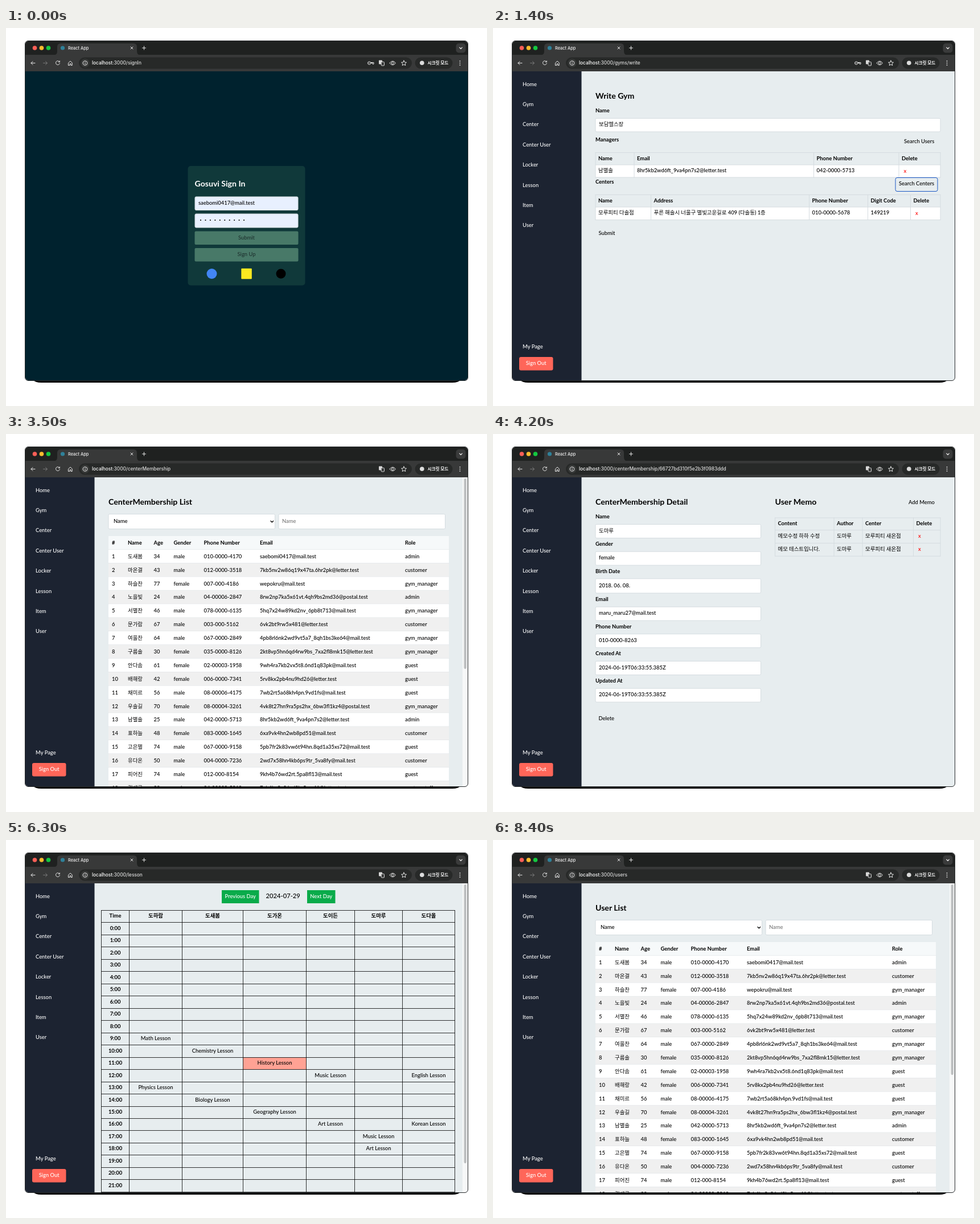
These frames come from a looping animation (845 by 663 pixels, 9.1 s). An HTML page:

```html
<!DOCTYPE html>
<html lang="ko">
<head>
<meta charset="utf-8">
<title>Gym admin tour</title>
<style>
html, body { margin: 0; width: 845px; height: 663px; overflow: hidden; background: #fff }
svg { display: block; font: 500 9.4px Lato, "Noto Sans CJK KR", "Noto Sans CJK", sans-serif }
.ui { font-family: Inter, "Noto Sans CJK KR", "Noto Sans CJK", sans-serif }
.b { font-weight: 700 }
.h { font-weight: 700; font-size: 14.1px }
.m { text-anchor: middle }
.line { fill: none; stroke-linecap: round; stroke-linejoin: round }
</style>
</head>
<body>
<svg id="stage" width="845" height="663" viewBox="0 0 845 663">
  <defs><clipPath id="win"><rect x="34" y="23" width="777" height="595" rx="5"/></clipPath></defs>
  <path d="M47 617H799Q795 622 784 622H62Q51 622 47 617Z"/>
  <g clip-path="url(#win)"><g id="page"></g><g id="chrome"></g></g>
  <rect x="33.5" y="22.5" width="778" height="596" rx="5.5" fill="none" stroke="#292c2d"/>
</svg>
<script>
const STEP = 700;
const EDGE = '#d5dce0', BG = '#e7edef';

const text = (x, y, s, cls = '', fill = '#000', extra = '') =>
  `<text x="${x}" y="${y}" class="${cls}" fill="${fill}" ${extra}>${s}</text>`;
const box = (x, y, x2, y2, fill, r = 0, stroke = 'none') =>
  `<rect x="${x}" y="${y}" width="${x2 - x}" height="${y2 - y}" rx="${r}" fill="${fill}" stroke="${stroke}"/>`;
const dot = (x, y, r, fill) => `<circle cx="${x}" cy="${y}" r="${r}" fill="${fill}"/>`;
const line = (d, stroke = '#e4e4e4', w = 1) =>
  `<path class="line" d="${d}" stroke="${stroke}" stroke-width="${w}"/>`;
const each = (list, fn) => list.map(fn).join('');
const label = (y, s) => text(180, y, s, 'b');
const title = (s, x = 180) => text(x, 124, s, 'h');
const button = (x, y, x2, y2, s, fill, r = 3, ink = '#fff') =>
  box(x, y, x2, y2, fill, r) + text((x + x2) / 2, (y + y2) / 2 + 2.3, s, 'm', ink);
const input = (x, y, x2, y2, s, ink) =>
  box(x, y, x2, y2, '#fff', 2, EDGE) + text(x + 6, (y + y2) / 2 + 2.2, s, '', ink);
const select = (x, y, x2, y2, s) =>
  box(x, y, x2, y2, '#fff', 2, EDGE) + text(x + 9, (y + y2) / 2 + 2.4, s) +
  line(`M${x2 - 7.5} ${(y + y2) / 2 - 1}l2.3 2.3 2.3-2.3`, '#000', 1.3);
const scrollbar = end => box(802, 76, 811, 618, '#f7f8f8') + box(804.5, 78, 809, end, '#bfc1c2', 2.2);

// Text block centred on cy
const block = (x, cy, s, cls) => {
  const lines = String(s).split('\n');
  return each(lines, (t, i) => text(x, cy + 3.2 + (i - (lines.length - 1) / 2) * 11.6, t, cls));
};

// Bordered table; "x" cells are red delete marks
const grid = (xs, ys, rows, fill) => {
  const [x0, x1, y0, y1] = [xs[0], xs.at(-1), ys[0], ys.at(-1)];
  return box(x0, ys[1], x1, y1, fill) +
    line(each(xs, x => `M${x} ${y0}V${y1}`) + each(ys, y => `M${x0} ${y}H${x1}`), EDGE) +
    each(rows, (row, r) => each(row, (s, c) => s === 'x'
      ? text(xs[c] + 8.5, ys[r] + 13.5, s, '', '#f00')
      : text(xs[c] + 5, ys[r] + 13.2, s, r ? '' : 'b')));
};

// Striped list; heights[0] is the header
const striped = (xs, x2, y, heights, rows) => each(rows, (row, r) => {
  const h = heights[r] ?? heights.at(-1), cy = y + h / 2;
  const out = box(180, y, x2, y + h, r ? (r % 2 ? '#fff' : '#f0f0f0') : '#f6f9fa') +
    line(`M180 ${y + h}H${x2}`, '#d9dee1', .8) +
    each(row, (s, c) => Array.isArray(s) ? facilities(xs[c], cy, s) : block(xs[c], cy, s, r ? '' : 'b'));
  y += h;
  return out;
});

const ICONS = {
  towel: 'M-3-5H5V3H-3ZM-5 2H3V5H-5ZM-3 0H5',
  locker: 'M-5-5H5V5H-5ZM0-5V5M-3-2H-2M2-2H3M-3 0H-2M2 0H3',
  wifi: 'M-5-1Q0-6 5-1M-3 1Q0-2 3 1M-1 3H1',
  shower: 'M-4 5V-3Q-4-5 0-5Q4-5 4-1H-1M-1 1V2M2 1V2M4 1V2M0 4V5M3 4V5M-5 5H-2',
  gymClothing: 'M-5 0Q-3-5 1-4Q5-3 5 4H2V0L0-2L-2 0V4M-3-1H3',
  parking: 'M-4.5-4.5H4.5V4.5H-4.5ZM-1 3V-2.5H1Q3-1 1 .5H-1',
  bodyCompositionAnalysis: 'M-4-3L-2-4M-5 0H-4M-4 3L-2 4M-1-2H1V0H-1ZM-2 2H2M2 1L5 4M1 4H5',
  bodyFatTest: 'M-3-1V-5H3V-1M-4-1H4V5H-4ZM-1 2H1'
};
const facilities = (x, cy, names) => each(names, (name, i) => {
  const y = cy + (i - (names.length - 1) / 2) * 12.15;
  return `<g transform="translate(${x + 5.5} ${y + 1})">${line(ICONS[name], '#111')}</g>` + text(x + 15, y + 3, name);
});

const SIDE = ['Home', 'Gym', 'Center', 'Center User', 'Locker', 'Lesson', 'Item', 'User'];
const shell = body => box(34, 76, 811, 618, BG) + box(34, 76, 155.5, 618, '#1c2331') +
  each(SIDE, (s, i) => text(52, 101.5 + i * 35.4, s, '', '#fff')) + text(52, 562, 'My Page', '', '#fff') +
  button(46, 577, 105.5, 600.5, 'Sign Out', '#ff6659') + body;

const USERS = `도새봄|34|male|010-0000-4170|saebomi0417@mail.test|admin
마온결|43|male|012-0000-3518|7kb5nv2w86q19x47ta.6hr2pk@letter.test|customer
하슬찬|77|female|007-000-4186|wepokru@mail.test|gym_manager
노을빛|24|male|04-00006-2847|8rw2np7ka5x61vt.4qh9bs2md36@postal.test|admin
서별찬|46|male|078-0000-6135|5hq7x24w89kd2nv_6pb8t713@mail.test|gym_manager
문가람|67|male|003-000-5162|6vk2bt9rw5x481@letter.test|customer
여울찬|64|male|067-0000-2849|4pb8rl6nk2wd9vt5a7_8qh1bs3ke64@mail.test|gym_manager
구름솔|30|female|035-0000-8126|2kt8vp5hn6qd4rw9bs_7xa2fl8mk15@letter.test|gym_manager
안다솜|61|female|02-00003-1958|9wh4ra7kb2vx5t8.6nd1q83pk@mail.test|guest
배해랑|42|female|006-0000-7341|5rv8kx2pb4nu9hd26@letter.test|guest
채미르|56|male|08-00006-4175|7wb2rt5a68kh4pn.9vd1fs@mail.test|guest
우솔길|70|female|08-00004-3261|4vk8t27hn9ra5ps2hx_6bw3fl1kz4@postal.test|gym_manager
남별솔|25|male|042-0000-5713|8hr5kb2wd6ft_9va4pn7s2@letter.test|admin
표하늘|48|female|083-0000-1645|6xa9vk4hn2wb8pd51@mail.test|customer
고은별|74|male|067-0000-9158|5pb7fr2k83vw6t94hn.8qd1a35xs72@mail.test|guest
유다온|50|male|004-0000-7236|2wd7x58hn4kb6ps9tr_5va8fy@mail.test|customer
피어진|74|male|012-000-8154|9kh4b76wd2rt.5pa8fl13@mail.test|guest
길새론|38|male|04-00002-5918|7vb4kp9a26xd8hr5wn41@letter.test|center_staff`.split('\n').map((s, i) => [i + 1, ...s.split('|')]);
const [ME, MY_MAIL] = [USERS[0][1], USERS[0][5]];

const userTable = name => shell(title(name) + select(180, 140.5, 472.5, 166.5, 'Name') +
  input(479, 140.5, 771.5, 166.5, 'Name', '#757575') +
  striped([186, 214, 259.5, 294.5, 347.5, 446, 701], 778, 179, [23.7, 23.88],
    [['#', 'Name', 'Age', 'Gender', 'Phone Number', 'Email', 'Role'], ...USERS]) + scrollbar(412));

const listPage = (name, add, xs, heights, rows) => shell(title(name) +
  button(716, 100, 787, 124.5, add, '#06f') + select(180, 152.5, 477, 179, 'Name') +
  input(483.5, 152.5, 780.5, 179, 'Name', '#757575') + striped(xs, 787, 191, heights, rows));

const GYM = '보담헬스장', BRAND = '모루피티';
const MANAGER = USERS[12];
const gymRows = [['#', 'Name', 'Managers', 'Centers'],
  [1, BRAND, ME, BRAND + ' 새온점'], [2, '너울헬스장', '마온결', BRAND + ' 늘봄점']];
const gymList = rows => listPage('Gym List', 'Add Gym', [186, 214, 400, 580], [24], rows);

const signIn = () => box(34, 76, 811, 618, '#00222e') + box(319.5, 242, 525.5, 451.5, '#10393a', 5) +
  text(331.5, 278, 'Gosuvi Sign In', 'h', '#fff') +
  box(332, 296, 513, 319.5, '#e8f0fe', 2, EDGE) + text(338, 309.8, MY_MAIL) +
  box(332, 326, 513, 350, '#e8f0fe', 2, EDGE) + each([...Array(10).keys()], i => dot(342 + i * 8.45, 337, 1.05, '#000')) +
  button(331.5, 356.5, 513.5, 380, 'Submit', '#487968', 2, '#1e322f') +
  button(331.5, 386, 513.5, 409.5, 'Sign Up', '#487968', 2, '#1e322f') +
  dot(361.5, 431, 9, '#4285f4') + box(413.3, 421.8, 431.8, 440.2, '#fbe920', 1) + dot(483, 431, 8.5, '#000');

const writeGym = () => shell(title('Write Gym') + label(148, 'Name') + input(180, 158.5, 786, 182, GYM) +
  label(199.3, 'Managers') + text(722, 202.3, 'Search Users') +
  grid([180, 248, 563.5, 713, 786], [218.5, 240, 262],
    [['Name', 'Email', 'Phone Number', 'Delete'], [MANAGER[1], MANAGER[5], MANAGER[4], 'x']], '#fff') +
  label(273.3, 'Centers') + box(707, 262.5, 781, 286.5, BG, 3, '#1a57c4') + text(713, 276.3, 'Search Centers') +
  grid([180, 277.5, 555.5, 658.5, 733.5, 786], [292.5, 314, 336.5],
    [['Name', 'Address', 'Phone Number', 'Digit Code', 'Delete'],
     [BRAND + ' 다솔점', '푸른 해솔시 너울구 별빛고운길로 409 (다솔동) 1층', '010-0000-5678', '149219', 'x']], '#fff') +
  text(185.5, 363, 'Submit'));

const OPEN = '24시간 영업 연\n중무휴';
const centerList = () => listPage('Center List', 'Add Center',
  [186, 203.5, 257.5, 409.5, 472.5, 522.5, 654, 729.5], [35, 35, 86, 110, 60.5], [
    ['#', 'Name', 'Address', 'Phone\nNumber', 'Digit\nCode', 'Facilities', 'Operating\nTime', 'Staff\nMembers'],
    [1, BRAND + '\n새온점', '구름 윤구 너른대로 610 (새온동, 늘\n빛해프라자) 3층', '0507-0000-\n6172', '624729',
      ['towel'], '24시간 영업 연\n중 무휴', 3],
    [2, BRAND + '\n늘봄점', '푸른 달빛시 고운구 솔내로315번길\n58 (늘봄, 온누타운) 3층', '0507-0000-\n2846', '157708',
      ['towel', 'locker', 'wifi', 'shower', 'gymClothing', 'parking'], OPEN, 3],
    [3, BRAND + '\n은솔점', '푸른 달빛시 은솔구 은솔로247번길\n19 (은솔본동, 한별타워누리) 1층', '0507-0000-\n9351', '890174',
      ['towel', 'bodyCompositionAnalysis', 'wifi', 'shower', 'locker', 'gymClothing', 'parking', 'bodyFatTest'], OPEN, 2],
    [4, BRAND + '\n다솔점', '푸른 해솔시 너울구 별빛고운길로\n409 (다솔동) 1층', '010-0000-\n5678', '149219',
      ['towel', 'shower', 'parking', 'bodyCompositionAnalysis'], OPEN, 5]]);

const MEMBER = '도마루';
const formRows = rows => each(rows, ([name, y, s, h = 24]) => label(y - 10.3, name) + input(180, y, 470.5, y + h, s));
const memberDetail = () => shell(title('CenterMembership Detail') +
  formRows([['Name', 158.5, MEMBER], ['Gender', 206.2, 'female'], ['Birth Date', 253.8, '2018. 06. 08.', 25.3],
    ['Email', 303.2, 'maru_maru27@mail.test'], ['Phone Number', 350.8, '010-0000-8263'],
    ['Created At', 398.5, '2024-06-19T06:33:55.385Z'], ['Updated At', 446.2, '2024-06-19T06:33:55.385Z']]) +
  text(185.5, 502.3, 'Delete') + title('User Memo', 495.5) + text(730, 122.7, 'Add Memo') +
  grid([495.5, 599, 649, 738.5, 786], [147, 168.5, 191.5, 214.2],
    [['Content', 'Author', 'Center', 'Delete'], ['메모수정 하하 수정', MEMBER, BRAND + ' 새온점', 'x'],
     ['메모 테스트입니다.', MEMBER, BRAND + ' 새온점', 'x']], 'none'));

const lockerList = () => listPage('Locker List', 'Add Locker', [186, 214, 360, 500, 640], [24],
  [['#', 'Center', 'Number', 'User', 'Status'],
   ...[1, 2, 3, 4, 5, 6].map(n => [n, BRAND + ' 새온점', n, USERS[n][1], 'in use'])]);
const lockerDetail = () => shell(title('Locker Detail') + formRows([['Center', 158.5, BRAND + ' 새온점'],
  ['Number', 206.2, '1'], ['User', 253.8, USERS[1][1]], ['Status', 301.5, 'in use']]) +
  text(185.5, 357, 'Update') + text(234, 357, 'Delete'));

// Lessons as [column, hour, subject]
const LESSONS = [[1, 9, 'Math'], [2, 10, 'Chemistry'], [3, 11, 'History'], [4, 12, 'Music'], [6, 12, 'English'],
  [1, 13, 'Physics'], [2, 14, 'Biology'], [3, 15, 'Geography'], [4, 16, 'Art'], [6, 16, 'Korean'],
  [5, 17, 'Music'], [5, 18, 'Art']];
const lessons = () => {
  const xs = [167.5, 216.5, 309.5, 416.5, 527.5, 612.5, 696.5, 788.5];
  const top = r => 123.5 + r * 21.47, mid = c => (xs[c] + xs[c + 1]) / 2;
  const ys = [...Array(24).keys()].map(r => Math.floor(top(r)) + .5);
  return shell(button(379, 88, 444.5, 111, 'Previous Day', '#0aab4a', 0) +
    button(529, 88, 578.5, 111, 'Next Day', '#0aab4a', 0) +
    text(486.7, 102.3, '2024-07-29', 'm', '#000', 'style="font-size:11.2px"') +
    box(416.5, ys[12], 527.5, ys[13], '#ffa294') +
    line(each(xs, x => `M${x} 123.5V620`) + each(ys, y => `M167.5 ${y}H788.5`), '#000', .8) +
    each(['Time', '도하람', ME, '도가온', '도이든', MEMBER, '도다올'], (s, c) => text(mid(c), 136.3, s, 'm b')) +
    each(ys.slice(1), (y, h) => text(mid(0), top(h + 1) + 13, h + ':00', 'm b')) +
    each(LESSONS, ([c, h, s]) => text(mid(c), top(h + 1) + 13, s + ' Lesson', 'm')) + scrollbar(567));
};

const itemList = () => listPage('Item List', 'Add Item', [186, 214, 380, 500, 640], [24],
  [['#', 'Title', 'Type', 'Category', 'Price'], [1, '헬스장 1개월', 'Once', 'pt', '50000'],
   [2, '헬스장 3개월', 'Once', 'pt', '140000']]);
const writeItem = () => shell(title('Write Item') +
  each([[148.3, '상품 정보'], [165.6, 'Type'], [215, 'Category'], [264.5, 'Title'], [312, 'Price'],
    [360, '상품 유형 정보'], [377.4, 'Payment Type'], [426.8, 'Days']], a => label(...a)) +
  select(180, 175.5, 786, 201, 'Once') + select(180, 225.2, 786, 250.7, 'pt') +
  input(180, 274.5, 786, 298, '헬스장 1개월') + input(180, 322.2, 786, 346, '50000') +
  select(180, 387.3, 786, 412.7, 'Periodic') + input(180, 436.5, 786, 460.5, '30') +
  text(185.5, 492.8, 'Update') + text(233.5, 492.8, 'Delete'));

const chrome = (path, hasKey) => box(34, 23, 811, 48, '#1f2120') + box(34, 47, 811, 76, '#383939') +
  `<path d="M84 47.5Q90 47 90 41V33Q90 27 96 27H224Q230 27 230 33V41Q230 47 236 47.5Z" fill="#383939"/>` +
  dot(50.5, 35, 3.8, '#ff5f57') + dot(62.5, 35, 3.8, '#febc2e') + dot(74.5, 35, 3.8, '#14c840') +
  dot(99.5, 35, 3.6, '#2f8199') + text(109, 37.8, 'React App', 'ui', '#f0f0f0', 'style="font-size:7.4px"') +
  line('M219 33l4 4m0-4l-4 4M239.5 35h6m-3-3v6', '#e6e6e6') +
  box(790.5, 27, 807.5, 43.5, '#3a3b3b', 5) + line('M796.7 34.2l2.3 2.3 2.3-2.3', '#eee', 1.2) +
  box(128, 51.5, 713, 71.5, '#272928', 10) + box(718.5, 51.5, 784.5, 71.5, '#272928', 10) +
  line('M51 61.5h-7m3-3l-3 3 3 3M94 59.3A3.5 3.5 0 1 0 94.4 62M94.3 57.7v2h-2M109.8 61l3.2-3 3.2 3v4.5h-2.2v-2.7h-2v2.7h-2.2z') +
  line('M65.5 61.5h7m-3-3l3 3-3 3', '#777') +
  dot(139, 61.5, 7.5, '#373938') + line('M135.2 61.5a3.8 3.8 0 1 0 7.6 0a3.8 3.8 0 1 0-7.6 0M139 61v2.3M139 59.4v.1') +
  text(151, 64.3, `<tspan fill="#fff">localhost</tspan>${path}`, 'ui', '#dcdcdc', 'style="font-size:8.3px"') +
  (hasKey ? line('M635.5 61.5a2.6 2.6 0 1 0 5.2 0a2.6 2.6 0 1 0-5.2 0M637.7 61.5h.8M641 60.5h5v2.7h-2v-1.5h-3') : '') +
  box(655, 56.5, 661, 63.5, '#d8d8d8', 1) + box(659.2, 59.5, 664.5, 66, '#383939', 1, '#d8d8d8') +
  line('M674 61.5Q679.2 54.5 684.5 61.5Q679.2 68.5 674 61.5M677.3 61.5a2 2 0 1 0 4 0a2 2 0 1 0-4 0') +
  line('M699 57l1.3 3 3.2.3-2.4 2.2.7 3.2-2.8-1.7-2.8 1.7.7-3.2-2.4-2.2 3.2-.3z') +
  dot(730.8, 61.3, 3.8, '#dcdcdc') + text(740.5, 64.2, '시크릿 모드', 'ui b', '#fff', 'style="font-size:7.6px"') +
  each([58, 61.5, 65], y => dot(797.5, y, .9, '#ddd'));

const PAGES = [
  ['/signIn', signIn],
  ['/gyms', () => gymList(gymRows)],
  ['/gyms/write', writeGym],
  ['/gyms', () => gymList([...gymRows, [3, GYM, MANAGER[1], BRAND + ' 다솔점']])],
  ['/center', centerList],
  ['/centerMembership', () => userTable('CenterMembership List')],
  ['/centerMembership/66727bd310f5e2b3f0983ddd', memberDetail],
  ['/locker', lockerList],
  ['/locker/detail', lockerDetail],
  ['/lesson', lessons],
  ['/item', itemList],
  ['/item/66a33bd443d493412fa846bd', writeItem],
  ['/users', () => userTable('User List')]
];

const byId = id => document.getElementById(id);
let shown = -1;
function tick() {
  const i = Math.floor(performance.now() / STEP) % PAGES.length;
  if (i !== shown) {
    shown = i;
    const [path, draw] = PAGES[i];
    byId('page').innerHTML = draw();
    byId('chrome').innerHTML = chrome(':3000' + path, i < 5);
  }
  requestAnimationFrame(tick);
}
tick();
</script>
</body>
</html>
```
